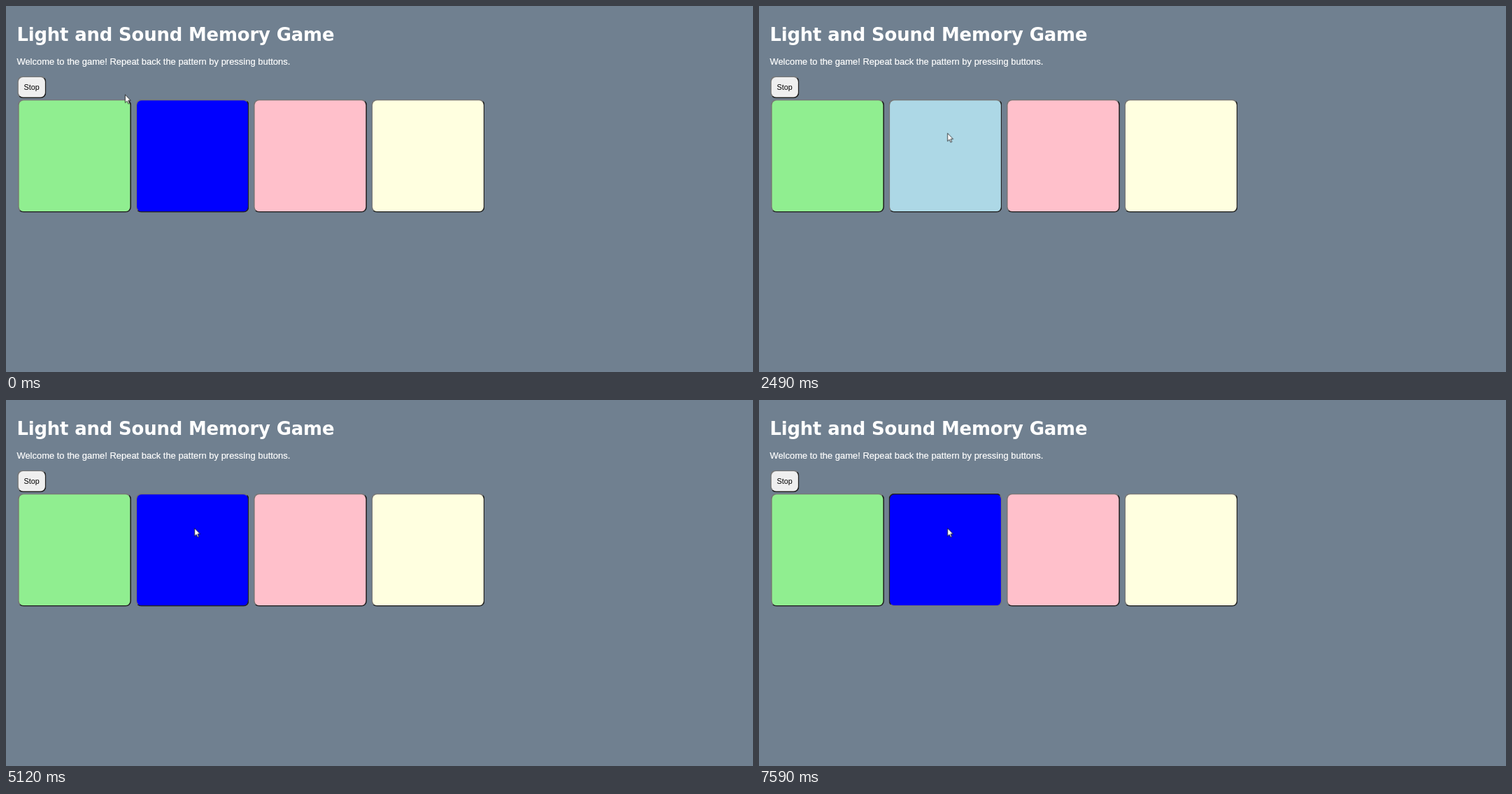
Recreate the animation shown at these times as an HTML page. Size 1068 by 524 pixels, loop 8 s.

```html
<!DOCTYPE html>
<html lang="en">
<head>
<meta charset="utf-8">
<title>Light and Sound Memory Game</title>
<style>
  html, body {
    margin: 0;
    width: 100%;
    height: 100%;
    overflow: hidden;
    background: #708090;
  }
  .page {
    position: absolute;
    left: 0;
    top: 0;
    width: 1319px;
    height: 647px;
    transform: scale(.81);
    transform-origin: 0 0;
    font: 16px/0 "Liberation Sans", Arial, sans-serif;
    color: #fff;
  }
  .page > * {
    position: absolute;
    margin: 0;
    white-space: nowrap;
  }
  h1 {
    left: 19px;
    top: 50.7px;
    font: bold 32px/0 "DejaVu Sans", Verdana, sans-serif;
    letter-spacing: -.21px;
  }
  p {
    left: 19px;
    top: 98.5px;
    -webkit-text-stroke: .25px #fff;
  }
  .button {
    box-sizing: border-box;
    border: 2px solid;
    border-color: #767676 #222 #222 #767676;
    border-radius: 10px;
  }
  .stop {
    left: 19.5px;
    top: 124.4px;
    width: 51.4px;
    height: 39px;
    background: #efefef;
    color: #000;
    font-size: 13.333px;
    line-height: 35px;
    text-align: center;
  }
  .tile {
    left: calc(21.2px + var(--i) * 208px);
    top: 164.8px;
    width: 200px;
    height: 200px;
  }
  .green { --i: 0; background: lightgreen; }
  .blue { --i: 1; background: lightblue; animation: light 8s step-end infinite; }
  .pink { --i: 2; background: pink; }
  .yellow { --i: 3; background: lightyellow; }

  .cursor {
    position: absolute;
    left: 0;
    top: 0;
    width: 9px;
    height: 14px;
    overflow: visible;
    animation: move 8s step-end infinite;
  }

  @keyframes light {
    0%, 45.125%, 60.375% {
      background: blue;
      border-color: #767676 #222 #222 #767676;
    }
    10.375%, 31.125%, 56.875%, 73%, 87% {
      background: lightblue;
      border-color: #767676 #222 #222 #767676;
    }
    22.125%, 79.75%, 94.875%, 100% {
      background: blue;
      border-color: #222 #767676 #767676 #222;
    }
  }
  @keyframes move {
    0% { transform: translate(170px, 126.6px); }
    3.75% { transform: translate(174px, 125px); }
    5.625% { transform: translate(184px, 119px); }
    7.5% { transform: translate(198px, 116px); }
    9.375% { transform: translate(212px, 114px); }
    11.375% { transform: translate(226px, 114px); }
    13.25% { transform: translate(238px, 115px); }
    15.125% { transform: translate(258px, 146px); }
    17% { transform: translate(268px, 177px); }
    18.875% { transform: translate(269.2px, 181.8px); }
    55% { transform: translate(269.2px, 182.4px); }
    64%, 100% { transform: translate(269.2px, 183.2px); }
  }
</style>
</head>
<body>
<div class="page">
  <h1>Light and Sound Memory Game</h1>
  <p>Welcome to the game! Repeat back the pattern by pressing buttons.</p>
  <div class="button stop">Stop</div>
  <div class="button tile green"></div>
  <div class="button tile blue"></div>
  <div class="button tile pink"></div>
  <div class="button tile yellow"></div>
</div>
<svg class="cursor" viewBox="0 0 12.5 19.44">
  <path d="M.5.5V16.5L4.2 13 6.6 18.5 9 17.5 6.7 12H11.5Z" fill="#fff" stroke="#000"/>
</svg>
</body>
</html>
```
